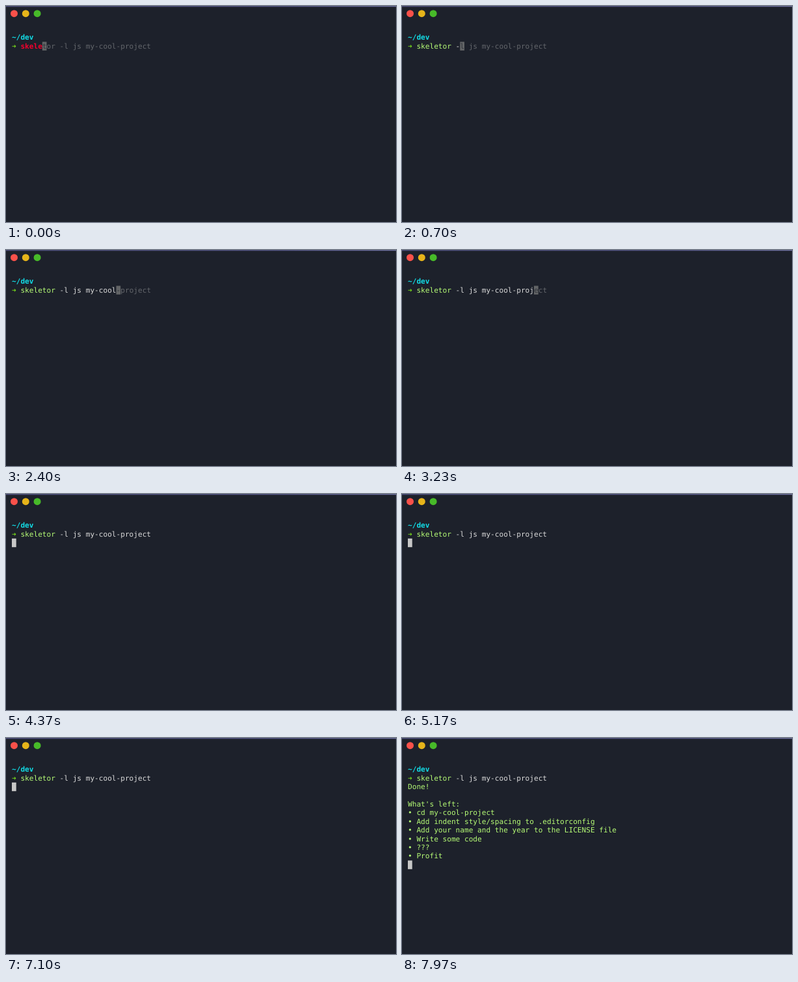
These frames come from a looping animation (600 by 334 pixels, 8000 ms). An HTML page with a canvas:

```html
<!DOCTYPE html>
<html lang="en">
<head>
<meta charset="utf-8">
<title>Terminal</title>
<style>
html, body { margin: 0; width: 100%; height: 100%; overflow: hidden; background: #1d212b; }
canvas { display: block; width: 600px; height: 334px; }
</style>
</head>
<body>
<canvas id="stage"></canvas>
<script>
const W = 600, H = 334, LOOP = 8000;
const CELL = 6.69, LINE = 13.4, LEFT = 9, TOP = 42;
const ENTER = 3920, DONE = 7740;
const FONT = '11.11px "DejaVu Sans Mono", monospace';
const PROGRAM = 'skeletor';
const COMMAND = 'skeletor -l js my-cool-project';
const OUTPUT = [
  'Done!',
  '',
  "What's left:",
  '• cd my-cool-project',
  '• Add indent style/spacing to .editorconfig',
  '• Add your name and the year to the LICENSE file',
  '• Write some code',
  '• ???',
  '• Profit'
];
// Typing pace: time in ms, characters typed
const PACE = [[0, 5.5], [1370, 14.5], [2400, 22.5], [3230, 27.5], [3700, 30]];
const COLOR = {
  back: '#1d212b', cyan: '#12dce6', arrow: '#74d51c', bad: '#f5002d',
  green: '#b5fb75', white: '#dadada', ghost: '#63666b',
  ghostCursor: '#626466', cursor: '#c7c7c7'
};

const canvas = document.getElementById('stage');
const ctx = canvas.getContext('2d');
const dpr = window.devicePixelRatio || 1;
canvas.width = W * dpr;
canvas.height = H * dpr;
ctx.scale(dpr, dpr);
ctx.textRendering = 'geometricPrecision';

function write(text, col, row, color, bold) {
  ctx.font = (bold ? 'bold ' : '') + FONT;
  ctx.fillStyle = color;
  ctx.fillText(text, LEFT + col * CELL, TOP + row * LINE + 10.4);
}

function cursor(col, row, color) {
  ctx.fillStyle = color;
  ctx.fillRect(LEFT + col * CELL, TOP + row * LINE, CELL, LINE);
}

function typedAt(t) {
  for (let i = 1; i < PACE.length; i++) {
    const [t0, n0] = PACE[i - 1], [t1, n1] = PACE[i];
    if (t < t1) return Math.floor(n0 + (n1 - n0) * (t - t0) / (t1 - t0));
  }
  return COMMAND.length;
}

function drawWindow() {
  ctx.fillStyle = COLOR.back;
  ctx.fillRect(0, 0, W, H);
  const edge = ctx.createLinearGradient(0, 0, W, 0);
  edge.addColorStop(0, '#4b4d7c');
  edge.addColorStop(0.7, '#555788');
  edge.addColorStop(1, '#7376a6');
  ctx.fillStyle = edge;
  ctx.fillRect(0, 0, W, 1);
  ctx.fillStyle = '#2c2f42';
  ctx.fillRect(0, 1, W, 1);
  ['#fa514a', '#e6b41a', '#47ba29'].forEach((color, i) => {
    ctx.fillStyle = color;
    ctx.beginPath();
    ctx.arc(12.5 + i * 17.8, 11.7, 5.5, 0, Math.PI * 2);
    ctx.fill();
  });
}

function drawCommand(count, entered) {
  const typed = COMMAND.slice(0, count);
  const known = typed.startsWith(PROGRAM);
  write('➜', 0, 1, COLOR.arrow, true);
  write(typed.slice(0, PROGRAM.length), 2, 1, known ? COLOR.green : COLOR.bad, !known);
  write(typed.slice(PROGRAM.length), 2 + PROGRAM.length, 1, COLOR.white);
  if (entered) return;
  const atEnd = count === COMMAND.length;
  cursor(2 + count, 1, atEnd ? COLOR.cursor : COLOR.ghostCursor);
  if (atEnd) return;
  write(COMMAND[count], 2 + count, 1, '#30343b');
  write(COMMAND.slice(count + 1), 3 + count, 1, COLOR.ghost);
}

function draw(t) {
  const entered = t >= ENTER;
  drawWindow();
  write('~/dev', 0, 0, COLOR.cyan, true);
  drawCommand(typedAt(t), entered);
  if (!entered) return;
  const lines = t >= DONE ? OUTPUT : [];
  lines.forEach((text, i) => write(text, 0, 2 + i, COLOR.green));
  cursor(0, 2 + lines.length, COLOR.cursor);
}

const start = performance.now();
function tick() {
  draw((performance.now() - start) % LOOP);
  requestAnimationFrame(tick);
}
tick();
</script>
</body>
</html>
```
